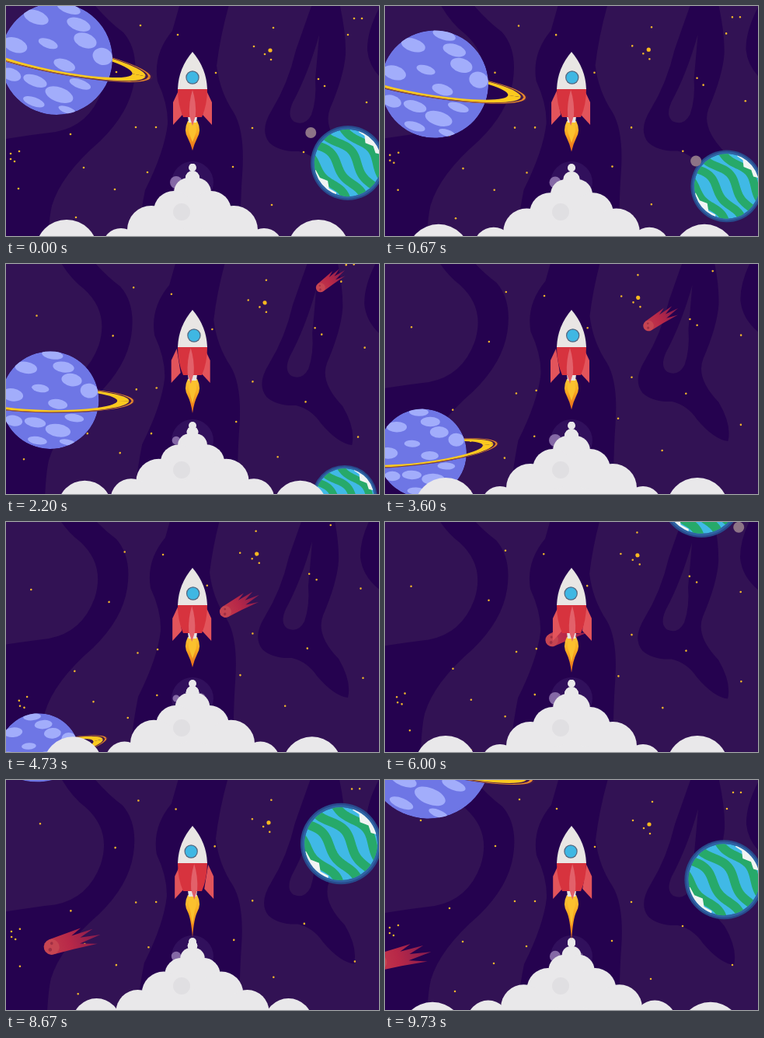
These frames come from a looping animation (480 px wide and 296 px high, 9.79 s). An HTML page with a canvas:

```html
<!DOCTYPE html>
<html lang="en">
<head>
<meta charset="utf-8">
<title>Rocket in space</title>
<style>
html, body { margin: 0; width: 100%; height: 100%; overflow: hidden; background: #25024f; }
canvas { display: block; width: 480px; height: 296px; }
</style>
</head>
<body>
<canvas id="stage" width="480" height="296"></canvas>
<script>
const ctx = document.getElementById('stage').getContext('2d');
const LOOP = 9790, TAU = Math.PI * 2, DEG = Math.PI / 180;
const lerp = (a, b, p) => a + (b - a) * p;
const smooth = (a, b, t) => {
  const p = Math.min(1, Math.max(0, (t - a) / (b - a)));
  return p * p * (3 - 2 * p);
};

function ellipse(x, y, rx, ry, color, tilt = 0) {
  ctx.fillStyle = color;
  ctx.beginPath();
  ctx.ellipse(x, y, rx, ry, tilt, 0, TAU);
  ctx.fill();
}
const disc = (x, y, r, color) => ellipse(x, y, r, r, color);

function fillPath(d, color) {
  ctx.fillStyle = color;
  ctx.fill(new Path2D(d));
}

function placed(x, y, angle, scale, draw) {
  ctx.save();
  ctx.translate(x, y);
  ctx.rotate(angle);
  ctx.scale(scale, scale);
  draw();
  ctx.restore();
}

// Background
const LIGHT = '#321254', DARK = '#25024f';
const WAVES = [
  ['M-40-40H50Q68 5 95 25Q128 55 114 98Q98 142 55 150Q20 154-40 164Z', LIGHT],
  ['M85-40Q112 0 142 22Q162 45 156 85Q150 125 112 162Q62 205 50 245Q44 270 44 340H156Q160 275 170 225Q195 175 199 140Q200 115 186 85Q180 50 205 20L222-40Z', LIGHT],
  ['M286-40Q268 15 262 65Q266 98 284 125Q299 150 295 205Q292 245 292 340H540V-40Z', LIGHT],
  ['M394-40Q378 5 364 45Q354 88 333 122Q317 148 330 164Q343 176 368 175Q388 180 400 198Q422 224 440 226Q445 205 428 176Q398 145 408 120Q426 78 428 50Q429 15 414-40Z', DARK],
  ['M394 25Q380 75 360 112Q352 130 362 137Q376 143 384 128Q391 108 389 82Q392 50 394 25Z', LIGHT],
  ['M490-40Q455 10 456 45Q460 86 520 108V-40Z', DARK]
];
const STARS = [
  [173, 25], [221, 37], [46, 52], [142, 85], [319, 52], [333, 62], [341, 69], [344, 28],
  [448, 16], [458, 16], [440, 37], [402, 94], [410, 103], [464, 124], [383, 188], [317, 157],
  [292, 207], [193, 156], [167, 156], [83, 165], [100, 208], [182, 214], [140, 236], [90, 272],
  [17, 187], [6, 190], [11, 200], [6, 197], [16, 235], [342, 256], [447, 238], [270, 86]
];

function drawSky(t) {
  const swing = (1 - Math.cos(TAU * t * 1000 / LOOP)) / 2;
  ctx.fillStyle = DARK;
  ctx.fillRect(0, 0, 480, 296);
  placed(lerp(9, 0, swing), lerp(12, 0, swing), 0, 1, () => {
    for (const [d, color] of WAVES) fillPath(d, color);
  });
  placed(240, 148, -10 * DEG * swing, 1, () => {
    for (const [x, y] of STARS) disc(x - 240, y - 148, 1.3, '#efb62c');
    disc(100, -91, 2.6, '#f9b91f');
  });
}

// Ringed planet; spots are in units of its radius
const SPOTS = [
  [.04, -.93, .22, .09], [-.5, -.66, .23, .12], [.27, -.68, .22, .11], [.44, -.42, .21, .13],
  [-.2, -.24, .18, .08], [-.77, -.1, .22, .13], [.8, -.2, .18, .15], [.16, .08, .2, .1],
  [.5, .36, .2, .08], [-.3, .46, .22, .1], [-.74, .43, .18, .11], [.17, .62, .26, .13],
  [-.25, .83, .2, .08], [.36, .86, .16, .06]
];

function ringHalf(front) {
  const start = front ? 0 : Math.PI;
  const band = (a, width, color) => {
    ctx.strokeStyle = color;
    ctx.lineWidth = width;
    ctx.beginPath();
    ctx.ellipse(0, 0, a, a, 0, start, start + Math.PI);
    ctx.stroke();
  };
  ctx.save();
  ctx.scale(1, .15);
  band(1.62, .25, '#44194b');
  band(1.5, .24, '#fbc91f');
  band(1.69, .045, '#e98a2c');
  ctx.restore();
}

function drawRinged(t) {
  const u = t < 6.5 ? t : t - 11.76;
  const x = 65 + u * (-.49 + u * (-2.02 + u * .235));
  const angle = 11.1 + u * (-3.28 + u * (-.93 + u * .116));
  placed(x, 68 + 48.7 * u, angle * DEG, 72 - 4.2 * u, () => {
    ringHalf(false);
    ctx.save();
    ctx.beginPath();
    ctx.arc(0, 0, 1, 0, TAU);
    ctx.clip();
    disc(0, 0, 1, '#6e76e5');
    for (const [sx, sy, rx, ry] of SPOTS) ellipse(sx, sy, rx, ry, '#a2adfb', .15);
    ctx.restore();
    ringHalf(true);
  });
}

// Striped planet and its moon
function drawStriped(t) {
  const v = t < 4.2 ? t : t - 11.4;
  const x = 440 + .4 * v - 1.05 * v * v;
  const y = 202 + 44.5 * v + .2 * v * v;
  const halo = 48 - 2.2 * v - .25 * v * v;
  const orbit = (180 + v * (v < 0 ? 29 : 46)) * DEG;
  const reach = 62 / 48 * halo * Math.cos(orbit);
  const moon = () => disc(x + reach * .77, y + reach * .63, 7, '#8d7487');
  const moonInFront = Math.sin(orbit) < 0;

  if (!moonInFront) moon();
  disc(x, y, halo, '#284a8c');
  disc(x, y, halo * .955, '#2f63a4');
  placed(x, y, 50 * DEG, halo * .9, () => {
    ctx.beginPath();
    ctx.arc(0, 0, 1, 0, TAU);
    ctx.clip();
    disc(0, 0, 1, '#40b9e6');
    ctx.strokeStyle = '#27a96a';
    ctx.lineWidth = .25;
    for (const offset of [-.7, -.22, .26, .74]) {
      ctx.beginPath();
      for (let px = -1.1; px <= 1.1; px += .05)
        ctx.lineTo(px, offset + .1 * Math.sin(px * 4 + offset * 3) + .1 * px * px);
      ctx.stroke();
    }
    fillPath('M-.8-1.1L-.5-.84L-.3-.9L-.12-.78L.1-.9L.3-.82L.7-1.1Z', '#f1f4f3');
    fillPath('M-.7 1.1L-.45.87L-.2.92L.02.8L.22.92L.45.83L.7 1.1Z', '#f1f4f3');
  });
  if (moonInFront) moon();
}

function drawComet(t) {
  const s = t - 1.4;
  const angle = Math.atan2(39 - 2.6 * s, -43 - 2.6 * s);
  placed(440 - 43 * s - 1.3 * s * s, 39 * s - 1.3 * s * s, angle, .78 + .09 * s, () => {
    const glow = ctx.createLinearGradient(6, 0, -40, 0);
    glow.addColorStop(0, '#c23d4d');
    glow.addColorStop(.5, '#b82848');
    glow.addColorStop(1, '#8b1d4e');
    fillPath('M0-7L-18-8L-40-10L-25-5L-45-3L-27 0L-40 4L-20 4L-30 8L0 7Z', glow);
    disc(0, 0, 7, '#c64552');
    disc(2, -2, 1.6, '#a03044');
    disc(-1, 3, 1.3, '#a03044');
  });
}

// Exhaust cloud: each puff steps from one key to the next every 600 ms.
// Keys hold distance from the axis, height and radius.
const PUFFS = [
  [0, 207, 4], [0, 221, 9], [5, 240, 19], [24, 264, 26], [53, 288, 31],
  [92, 310, 24], [162, 315, 40], [240, 370, 45]
];

function drawCloud(t) {
  const phase = t * 1000 / 600 % 1;
  const white = '#e9e8ea';
  const puffs = PUFFS.slice(1).map((key, i) => key.map((n, j) => lerp(PUFFS[i][j], n, phase)));
  disc(240, 227, 27, 'rgba(160,140,200,.1)');
  disc(219, 227, lerp(8, 4, phase), 'rgba(190,165,215,.6)');
  disc(251, 226, lerp(3, 6, phase), 'rgba(180,160,200,.5)');

  ctx.fillStyle = white;
  ctx.beginPath();
  ctx.moveTo(240, 210);
  for (const [d, y] of puffs.slice(0, 5)) ctx.lineTo(240 + d, y);
  ctx.lineTo(340, 330);
  ctx.lineTo(140, 330);
  for (const [d, y] of puffs.slice(0, 5).reverse()) ctx.lineTo(240 - d, y);
  ctx.fill();
  disc(240, 208, 5, white);
  for (const [d, y, r] of puffs) {
    disc(240 - d, y, r, white);
    disc(240 + d, y, r, white);
  }
  disc(226, 265, 11, 'rgba(205,203,208,.3)');
}

function drawRocket(t) {
  const sway = Math.sin(TAU * t / 10.6);
  const tip = 186 + 6 * Math.sin(Math.PI * t / 4.2) ** 2 + 16 * smooth(5.5, 7.8, t);
  const fire = ctx.createLinearGradient(0, 146, 0, tip);
  fire.addColorStop(0, '#f8c93c');
  fire.addColorStop(.45, '#f9a91f');
  fire.addColorStop(1, '#e9681c');
  fillPath(`M234 148Q228 160 234 170Q238 178 240 ${tip}Q242 178 246 170Q252 160 246 148Z`, fire);
  fillPath(`M237 149Q233 160 237 167L240 ${lerp(150, tip, .7)}L243 167Q247 160 243 149Z`, '#fbc12e');

  ctx.save();
  ctx.translate(-2.4 * sway, 0);
  fillPath('M222 109L215 124L215 153L227 140Z', '#e2545b');
  fillPath('M258 109L265 124L265 153L253 140Z', '#e2545b');
  ctx.restore();
  fillPath('M234 142H246L245 150H235Z', '#e7e3e2');
  fillPath('M240 59Q222 80 221 107H259Q258 80 240 59Z', '#e9e6e4');
  fillPath('M221 107H259Q259 127 252 143H228Q221 127 221 107Z', '#d7333e');
  placed(-2.4 * sway, 0, 0, 1, () =>
    fillPath('M240 108Q235 124 236 141L240 154L244 141Q245 124 240 108Z', '#e2616a'));
  disc(240 + 2 * sway, 92, 8.7, '#52667f');
  disc(240 + 2 * sway, 92, 7.5, '#3fb7e3');
}

function draw(now) {
  const t = now % LOOP / 1000;
  drawSky(t);
  drawStriped(t);
  drawRinged(t);
  drawComet(t);
  drawCloud(t);
  drawRocket(t);
}

let start;
function tick(now) {
  start ??= now;
  draw(now - start);
  requestAnimationFrame(tick);
}
draw(0);
requestAnimationFrame(tick);
</script>
</body>
</html>
```
